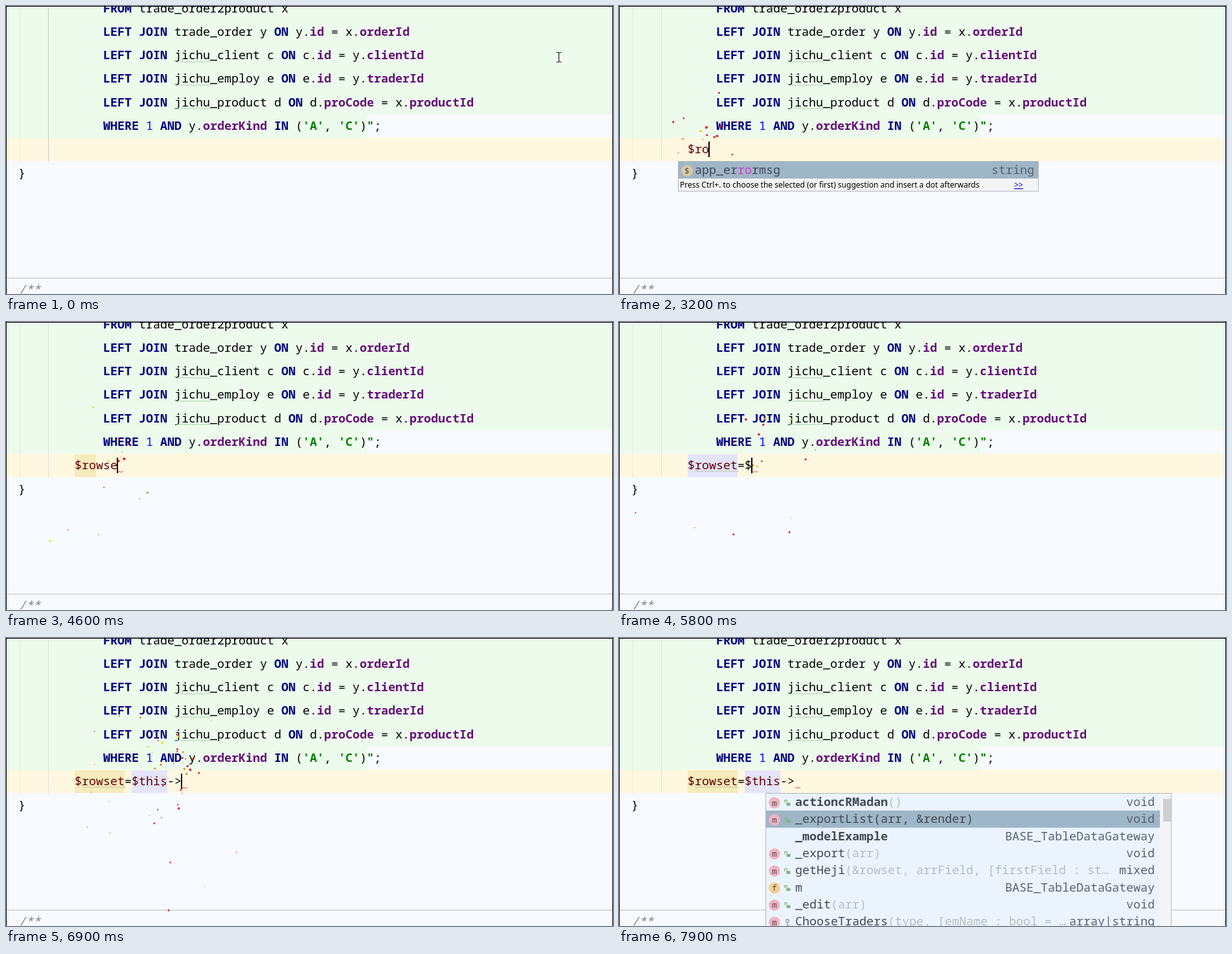
Recreate the animation shown at these times as an HTML page. Size 937 by 444 pixels, loop 8 s.

```html
<!DOCTYPE html>
<html lang="en">
<head>
<meta charset="utf-8">
<style>
html, body { margin: 0; width: 100%; height: 100%; overflow: hidden; background: #f7faff; }
svg { display: block; }
text { font: 18.33px "Noto Sans Mono", "DejaVu Sans Mono", monospace; white-space: pre; fill: #000; }
.kw { font-weight: 700; fill: #000080; }
.field { font-weight: 700; fill: #660e7a; }
.str { font-weight: 700; fill: #008000; }
.num { fill: #0000ff; }
.var { fill: #660000; }
.doc { font-style: italic; fill: #808080; }
.item { fill: #404a54; }
.bold { fill: #404a54; font-weight: 700; }
.type { fill: #56636f; }
.args { fill: #b8bcc0; }
.match { fill: #d23cc8; }
.hint { font: 12px "Noto Sans", sans-serif; }
.link { fill: #0000e0; text-decoration: underline; }
.badge { font-size: 13px; fill: #5c4a4c; text-anchor: middle; }
</style>
</head>
<body>
<svg width="937" height="444" viewBox="0 0 937 444">
  <g id="page"></g>
  <g id="live"></g>
  <path d="M0 .5H937M.5 0V444M936.5 0V444" stroke="#000"/>
</svg>
<script>
const LOOP = 8000, STEP = 100, CHAR = 11, LEFT = 106;
const page = document.getElementById('page');
const live = document.getElementById('live');

const esc = s => s.replace(/&/g, '&amp;').replace(/</g, '&lt;').replace(/>/g, '&gt;');
const span = (cls, s) => `<tspan class="${cls}">${esc(s)}</tspan>`;
const text = (x, y, body, attrs = '') => `<text x="${x}" y="${y}" ${attrs}>${body}</text>`;
const rect = (x, y, w, h, fill, attrs = '') =>
  `<rect x="${x}" y="${y}" width="${w}" height="${h}" fill="${fill}" ${attrs}/>`;
const line = (d, color, attrs = '') => `<path d="${d}" fill="none" stroke="${color}" ${attrs}/>`;
const wave = (x, y, width, color) =>
  line(`M${x} ${y + 1}` + 'l2 -2l2 2'.repeat(Math.round(width / 4)), color, 'stroke-width=".9"');

// Static editor page
const join = (table, alias, left, leftField, right, rightField) =>
  span('kw', 'LEFT JOIN') + ` ${table} ${alias} ` + span('kw', 'ON') +
  ` ${left}.` + (leftField === 'id' ? span('field', 'id') : span('field', leftField)) +
  ` = ${right}.` + span('field', rightField);

const query = [
  span('kw', 'FROM') + ' trade_order2product x',
  join('trade_order', 'y', 'y', 'id', 'x', 'orderId'),
  join('jichu_client', 'c', 'c', 'id', 'y', 'clientId'),
  join('jichu_employ', 'e', 'e', 'id', 'y', 'traderId'),
  join('jichu_product', 'd', 'd', 'proCode', 'x', 'productId'),
  span('kw', 'WHERE') + ' ' + span('num', '1') + ' ' + span('kw', 'AND') + ' y.' +
    span('field', 'orderKind') + ' ' + span('kw', 'IN') + ' (' + span('str', "'A'") + ', ' +
    span('str', "'C'") + ')' + span('str', '"') + ';'
];

page.innerHTML =
  rect(0, 0, 937, 444, '#f7faff') +
  rect(0, 0, 937, 167, '#ecfbec') +
  rect(0, 167, 557, 37, '#ecfbec') +
  rect(0, 203, 937, 36, '#fff8e1') +
  line('M21.5 0V239', '#d5ddd5', 'stroke-dasharray="1 1"') +
  query.map((q, i) => text(150, Math.round(9.6 + i * 36.25), q)).join('') +
  [86, 122, 158].map(y => wave(260, y, 55, '#a9cfa9')).join('') +
  text(19, 264, '}') +
  line('M0 419.5H937', '#c0c0c0') +
  text(20, 443, '/**', 'class="doc"');

// Typing: a time and the characters added then
const keys = [
  [900, ''], [2000, '$'], [2900, 'r'], [3100, 'o'], [3500, 'w'], [4000, 's'], [4500, 'e'],
  [4900, 't'], [5200, '='], [5600, '$'], [6000, 't'], [6200, 'h'], [6400, 'i'], [6500, 's'],
  [6700, '-'], [6800, '>']
].map(([at, ch], i, all) => ({
  at, i, typed: all.slice(0, i + 1).map(k => k[1]).join('')
}));
const caretX = key => LEFT + CHAR * key.typed.length;

const rand = n => {
  const v = Math.sin(n * 127.1 + 11.7) * 43758.5453;
  return v - Math.floor(v);
};

// Sparks leave the caret on every key and fall under gravity
function sparks(t) {
  let out = '';
  for (const key of keys) {
    const age = (t - key.at) / 1000;
    if (age < 0 || age > 1.4) continue;
    for (let j = 0; j < 9; j++) {
      const r = k => rand(key.i * 61 + j * 7 + k);
      const life = 0.4 + r(1);
      if (age > life) continue;
      const x = caretX(key) + (r(2) - 0.5) * 380 * age;
      const y = 218 - (60 + 390 * r(3)) * age + 450 * age * age;
      const size = 0.6 + 1.5 * r(4) * (1 - age / life * 0.5);
      const hue = r(5) < 0.6 ? r(6) * 20 - 10 : 25 + r(6) * 40;
      out += `<circle cx="${x.toFixed(1)}" cy="${y.toFixed(1)}" r="${size.toFixed(1)}" fill="hsl(${hue},95%,46%)"/>`;
    }
  }
  return out;
}

function pointer(t) {
  if (t >= 2000) return '';
  const stops = [[0, 853, 79], [100, 853, 79], [600, 260, 272], [900, 87, 220], [2000, 87, 220]];
  const n = stops.findIndex(s => s[0] > t);
  const [a, b] = [stops[n - 1], stops[n]];
  const p = (t - a[0]) / (b[0] - a[0]), u = p * p * (3 - 2 * p);
  const x = Math.round(a[1] + (b[1] - a[1]) * u), y = Math.round(a[2] + (b[2] - a[2]) * u);
  return line('M-3.5 -7.5H-1L.5 -6.5L2 -7.5H4.5M.5 -6.5V6.5M-3.5 7.5H-1L.5 6.5L2 7.5H4.5',
    '#222', `transform="translate(${x} ${y})" stroke-width="1.2"`);
}

const badge = (x, y, letter, fill) =>
  `<circle cx="${x}" cy="${y}" r="8.7" fill="${fill}"/>` + text(x, y + 4.5, letter, 'class="badge"');

function hintPopup(x, label, type) {
  return rect(x + .5, 239.5, 556, 46, '#f3f3f3', 'stroke="#b4b9be"') +
    rect(x + 1, 240, 555, 26, '#9fb6c6') +
    badge(x + 14, 254, '$', '#d8caa4') +
    text(x + 26, 259, label, 'class="item"') +
    text(x + 550, 259, type, 'class="type" text-anchor="end"') +
    text(x + 3, 280, 'Press Ctrl+. to choose the selected (or first) suggestion and insert a dot afterwards', 'class="hint"') +
    text(x + 519, 280, esc('>>'), 'class="hint link"');
}

const members = [
  ['m', span('bold', 'actioncRMadan') + span('args', '()'), 'void'],
  ['m', span('item', '_exportList(arr, &render)'), 'void'],
  ['', span('bold', '_modelExample'), 'BASE_TableDataGateway'],
  ['m', span('item', '_export') + span('args', '(arr)'), 'void'],
  ['m', span('item', 'getHeji') + span('args', '(&rowset, arrField, [firstField : st…'), 'mixed'],
  ['f', span('item', 'm'), 'BASE_TableDataGateway'],
  ['m', span('item', '_edit') + span('args', '(arr)'), 'void'],
  ['m', span('item', 'ChooseTraders') + span('args', '(type, [emName : bool = …'), 'array|string']
];

function access(y, last) {
  return last
    ? `<circle cx="260" cy="${y - 2}" r="2.4" fill="none" stroke="#9aa4ad" stroke-width="1.4"/>` +
      line(`M260 ${y + 1}V${y + 6}M260 ${y + 4.5}H263`, '#9aa4ad', 'stroke-width="1.4"')
    : rect(258.5, y, 6, 4.5, '#7cb77c') +
      line(`M255.5 ${y}V${y - 2}a2 2 0 0 1 4 0V${y}`, '#7cb77c', 'stroke-width="1.3"');
}

function memberPopup() {
  return rect(226.5, 239.5, 626, 220, '#ebf4fe', 'stroke="#b4b9be"') +
    rect(835, 240, 17, 204, '#f3f5f7') +
    rect(840, 248, 12, 35, '#cdcfd1') +
    rect(227, 266, 608, 26.5, '#9fb6c8') +
    members.map(([kind, label, type], i) => {
      const y = 253 + i * 26.3;
      const icons = kind && badge(240, y + 1, kind, kind === 'm' ? '#efb5c0' : '#f4d08f') +
        access(y + 1, i === members.length - 1);
      return icons + text(272, Math.round(y + 6), label) +
        text(827, Math.round(y + 6), type, 'class="type" text-anchor="end"');
    }).join('');
}

function codeLine(t, key) {
  const s = key.typed, [name, value] = s.split('=');
  const x = caretX(key);
  let out = '';
  if (t >= 3500 && t < 4900) out += rect(LEFT, 204, 33, 35, '#f6ebbc');
  if (t >= 5000) out += rect(LEFT, 204, 77, 35, t < 6600 ? '#e4e4fb' : '#f6ebbc');
  if (t >= 6600) out += rect(194, 204, 55, 35, '#e4e4fb');
  let body = span('var', name);
  if (value !== undefined) {
    body += '=' + (value.length < 2 ? value : span('var', value.slice(0, 5)) + esc(value.slice(5)));
  }
  out += text(LEFT, 227, body);
  if (t >= 5000) out += wave(117, 230, 66, '#b9c490');
  if (t >= 3500) out += wave(x + 1, 231, 9, '#e83030');
  if (Math.floor((t - key.at) / 350) % 2 === 0) out += rect(x - 1, 209, 2, 24, '#000');
  return out;
}

function render(t) {
  const key = keys.filter(k => k.at <= t).pop();
  let out = line('M65.5 0V239', key ? '#dde3da' : '#c6cbc4');
  if (key) out += codeLine(t, key);
  out += sparks(t);
  if (t >= 3100 && t < 3500) out += hintPopup(91, 'app_er' + span('match', 'ro') + 'rmsg', 'string');
  if (t >= 6100 && t < 6500) {
    const n = key.typed.split('$').pop().length;
    out += hintPopup(179, span('match', 'this'.slice(0, n)) + 'this'.slice(n), '');
  }
  if (t >= 7100) out += memberPopup();
  live.innerHTML = out + pointer(t);
}

const start = performance.now();
let shown = -1;
function tick() {
  const t = Math.floor(((performance.now() - start) % LOOP) / STEP) * STEP;
  if (t !== shown) render(shown = t);
  requestAnimationFrame(tick);
}
tick();
</script>
</body>
</html>
```
